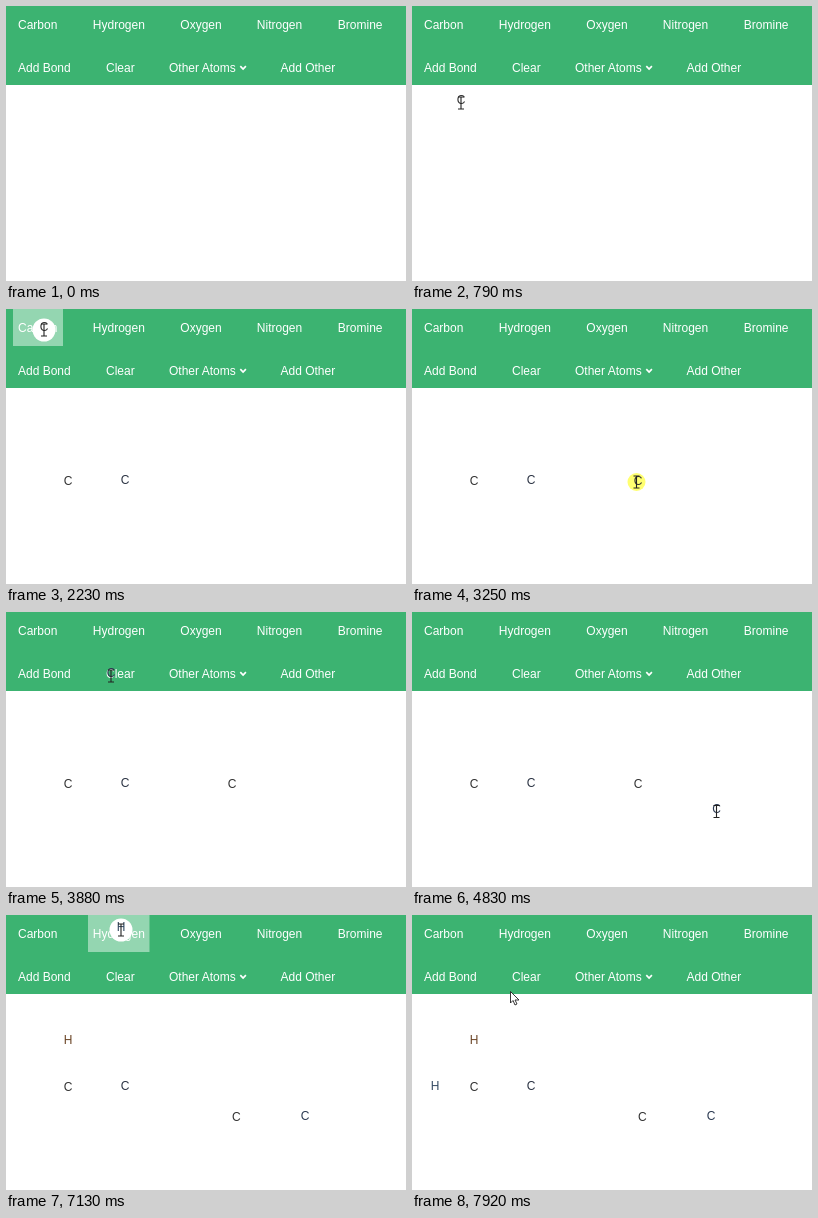
Write an HTML page that moves like this. It is 400 by 275 pixels and loops after 8000 ms.

```html
<!DOCTYPE html>
<html lang="en">
<head>
<meta charset="utf-8">
<title>Molecule builder</title>
<style>
  html, body { margin: 0; width: 100%; height: 100%; overflow: hidden; background: #fff; }
  svg { display: block; width: 400px; height: 275px; font: 12px "Liberation Sans", Arial, sans-serif; }
  #labels { fill: #fff; }
  #atoms { text-anchor: middle; }
</style>
</head>
<body>
<svg viewBox="0 0 400 275">
  <rect width="400" height="79" fill="#3cb371"/>
  <rect id="hover" height="37" fill="#fff" fill-opacity=".45"/>
  <g id="labels"></g>
  <path d="M234.3 60.2l2.8 2.8 2.8-2.8" fill="none" stroke="#fff" stroke-width="1.7"/>
  <circle id="ring"/>
  <g id="atoms"></g>
  <path id="beam" d="M-3-6H3M-3 6H3M0-6V6" fill="none" stroke="#222" stroke-width="1.1"/>
  <path id="arrow" d="M.5.5V12L3 9.5 5 14 7 13 5 9H9Z" fill="#fff" stroke="#222" stroke-width=".9"/>
</svg>
<script>
const LOOP = 8000, STEP = 80, PAUSE = 150;
const $ = id => document.getElementById(id);

const rows = [
  { y: 23, items: { Carbon: 12, Hydrogen: 86.8, Oxygen: 174.3, Nitrogen: 250.8, Bromine: 331.8 } },
  { y: 66, items: { "Add Bond": 12, "Clear": 100, "Other Atoms": 163, "Add Other": 274.5 } }
];
const buttons = [{ left: 7, width: 50 }, { left: 82, width: 61.5 }];

// Starts of the runs of steps; every run ends with a longer pause.
const runs = [0, 150, 2940, 3250, 3720, 4830, 5860, 6730, 7760, LOOP + PAUSE - STEP];

// Pointer path: time, x, y
const path = [
  [150, 225, 250], [550, 45, 32], [630, 36, 19], [950, 62, 175],
  [1030, 62, 172], [1270, 34, 18], [1510, 99, 118], [1830, 119, 174],
  [1910, 119, 174], [2150, 38, 20], [2310, 38, 22], [2630, 180, 174], [2710, 174, 174],
  [2940, 180, 174], [3100, 224, 173], [3250, 224.5, 173], [3490, 42, 24],
  [3720, 40, 22], [4360, 300, 190], [4680, 316, 200],
  [4830, 304.5, 199.5], [4990, 299, 201], [5230, 226, 174], [5710, 230, 205],
  [5860, 222, 194], [6100, 117, 18], [6180, 115, 23], [6500, 62, 128],
  [6730, 62, 120], [6970, 112, 20], [7130, 115, 15], [7450, 16, 180], [7530, 23, 174],
  [7760, 23, 174], [7920, 98, 76]
];

const clicks = [630, 1030, 1270, 1910, 2230, 3250, 3570, 4990, 6100, 6580, 7130];

const atoms = [
  { name: "C", color: "#333", drags: [{ from: 630, to: 1030, x: 62, y: 172 }] },
  { name: "C", color: "#2c3444", drags: [{ from: 1270, to: 1910, x: 119.2, y: 170.5 }] },
  { name: "C", color: "#333", drags: [
    { from: 2230, to: 3250, x: 226, y: 172 }, { from: 5310, to: 5860, x: 230.3, y: 202 }] },
  { name: "C", color: "#2c3a52", drags: [{ from: 3570, to: 4990, x: 299, y: 201 }] },
  { name: "H", color: "#6b4526", drags: [{ from: 6100, to: 6580, x: 62, y: 125 }] },
  { name: "H", color: "#344a62", drags: [{ from: 7130, to: 7760, x: 23, y: 171 }] }
];

function addText(parent, text, x, y) {
  const node = document.createElementNS("http://www.w3.org/2000/svg", "text");
  node.textContent = text;
  node.setAttribute("x", x);
  node.setAttribute("y", y);
  $(parent).append(node);
  return node;
}
for (const { y, items } of rows) {
  for (const [text, x] of Object.entries(items)) addText("labels", text, x, y);
}
for (const atom of atoms) {
  atom.node = addText("atoms", atom.name, 0, 4.3);
  atom.node.setAttribute("fill", atom.color);
}

function show(node, visible) {
  node.style.display = visible ? "" : "none";
}
function place(node, x, y) {
  node.setAttribute("transform", `translate(${x} ${y})`);
}

function snap(time) {
  const next = runs.findIndex(start => start > time);
  const start = runs[next - 1];
  return Math.min(start + Math.floor((time - start) / STEP) * STEP, runs[next] - PAUSE);
}

function pointerAt(time) {
  const next = path.findIndex(key => key[0] > time);
  if (next < 0) return path.at(-1).slice(1);
  if (next === 0) return path[0].slice(1);
  const [t0, x0, y0] = path[next - 1], [t1, x1, y1] = path[next];
  const k = (time - t0) / (t1 - t0);
  return [x0 + (x1 - x0) * k, y0 + (y1 - y0) * k];
}

function draw(time) {
  const visible = time >= PAUSE;
  const [x, y] = pointerAt(time);
  let dragging = false;

  for (const { node, drags } of atoms) {
    const drag = drags.findLast(({ from }) => time >= from);
    show(node, drag);
    if (!drag) continue;
    const held = time < drag.to;
    dragging ||= held;
    if (held) place(node, x, y - 3);
    else place(node, drag.x, drag.y);
  }

  const button = visible && y < 37 && buttons.find(({ left, width }) => x >= left && x <= left + width);
  show($("hover"), button);
  if (button) {
    $("hover").setAttribute("x", button.left);
    $("hover").setAttribute("width", button.width);
  }

  const clicked = clicks.some(click => time >= click && time < click + STEP);
  show($("ring"), clicked);
  $("ring").setAttribute("r", button ? 11.5 : 9);
  $("ring").setAttribute("fill", button ? "#fff" : "#ffff70");
  place($("ring"), x, y);

  const beam = dragging || button || clicked;
  show($("beam"), visible && beam);
  show($("arrow"), visible && !beam);
  place($("beam"), x, y);
  place($("arrow"), x, y);
}

const began = performance.now();
function tick() {
  draw(snap((performance.now() - began) % LOOP));
  requestAnimationFrame(tick);
}
tick();
</script>
</body>
</html>
```
